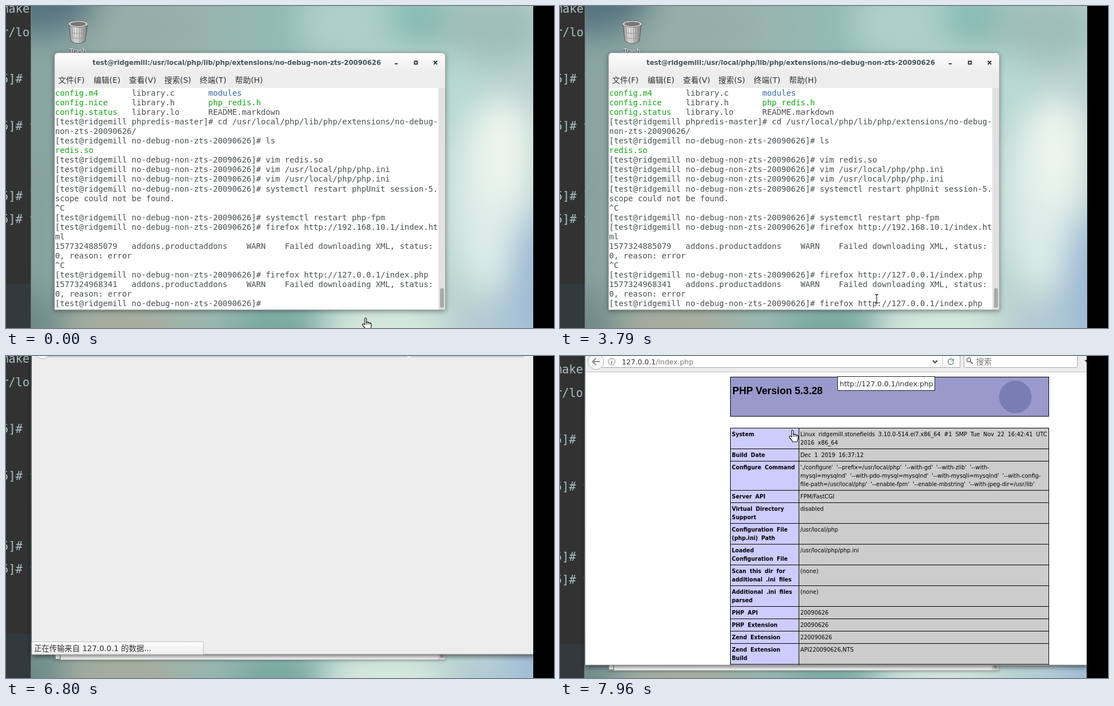
An HTML page for the animation above (8000 ms loop, 976x574 px).

```html
<!DOCTYPE html>
<html lang="zh-CN">
<head>
<meta charset="utf-8">
<title>Terminal and phpinfo</title>
<style>
html, body { margin: 0; width: 100%; height: 100%; overflow: hidden; background: #000 }
svg { display: block; width: 976px; height: 574px }
text { white-space: pre; font-family: "DejaVu Sans", "Noto Sans CJK SC", sans-serif }
.mono { font-family: "DejaVu Sans Mono", monospace }
.term { font-size: 14.16px }
.info { font-size: 9.9px; word-spacing: 2.8px }
.key { font-size: 9.6px; font-weight: bold }
.ui { font-size: 12.7px; fill: #333 }
</style>
</head>
<body>
<svg id="stage" viewBox="0 0 976 574"></svg>
<script>
const LOOP = 8000, CELL = 8.525, ROW = 17.05;
const text = (x, y, s, cls = '', more = '') =>
  `<text x="${x}" y="${y}" class="${cls}" ${more}>${s}</text>`;
const rect = (x, y, w, h, fill, more = '') =>
  `<rect x="${x}" y="${y}" width="${w}" height="${h}" fill="${fill}" ${more}/>`;
const path = (d, stroke, w = 1, fill = 'none', more = '') =>
  `<path d="${d}" stroke="${stroke}" stroke-width="${w}" fill="${fill}" ${more}/>`;
const fade = (id, dir, ...stops) => `<linearGradient id="${id}" ${dir}>` + stops.map((c, i) =>
  `<stop offset="${i / (stops.length - 1)}" stop-color="${c}"/>`).join('') + '</linearGradient>';
const DOWN = 'x2="0" y2="1"';

// Editor strip at the far left
const editor = () => rect(-5, -30, 55, 640, '#323232') + rect(-5, 495, 55, 120, '#333a3e') +
  [[0, 'make'], [1, 'r/lo'], [3, '5]# l'], [5, '5]# v'], [8, '5]# l'], [9, '5]# v']].map(([i, s]) =>
    text(-8, 12 + i * 41.7, s, 'mono', 'font-size="20.8" fill="#a9bfc2"')).join('');

// Soft blurred wallpaper: centre, radii, colour
const wallpaper = () => rect(45, -30, 900, 640, 'url(#sky)') +
  '<g clip-path="url(#desk)"><g filter="url(#soft)">' + [
    [50, 130, 60, 160, '#8aa5a2'], [50, -10, 110, 60, '#55737e'],
    [200, 600, 110, 70, '#a8ac9d'], [40, 580, 60, 70, '#6d8987'],
    [250, 40, 110, 50, '#96aea8'], [480, 590, 80, 60, '#78a8a0'], [600, 30, 80, 60, '#aed0ca'],
    [740, 20, 60, 60, '#86bab4'], [670, 580, 110, 50, '#d9e9df'], [860, 340, 70, 170, '#dcece8'],
    [890, 260, 50, 100, '#edf5ee'], [860, 40, 100, 60, '#9dbdb6'], [800, 140, 40, 60, '#b7d9d2'],
    [880, 590, 70, 60, '#b0c8d6'], [950, 490, 50, 120, '#9db8d4']
  ].map(([x, y, a, b, c]) => `<ellipse cx="${x}" cy="${y}" rx="${a}" ry="${b}" fill="${c}"/>`).join('') +
  '</g></g>' + rect(44, -30, 1, 640, '#777d7c');

const trash = () =>
  path('M112 33L116 63Q128 70 141 63L145 33Z', '#555', 1, 'url(#metal)') +
  [118, 122, 126, 131, 135, 139].map(x => path(`M${x} 39L${128 + (x - 128) * .8} 64`, '#8d8d8d')).join('') +
  path('M114 46Q128 52 143 46M115 55Q128 61 142 55', '#999') +
  '<ellipse cx="128.500" cy="32" rx="17.500" ry="6" fill="#ddd" stroke="#666"/>' +
  '<ellipse cx="128.500" cy="32" rx="14" ry="4" fill="#777"/>' +
  text(113, 85, 'Trash', '', 'font-size="11.5" fill="#fff" style="text-shadow:0 1px 2px #000"');

const DIR = 'no-debug-non-zts-20090626', EXT = '/usr/local/php/lib/php/extensions/';
const ask = (cmd, dir = DIR) => `[test@ridgemill ${dir}]# ${cmd}`;
const warn = id => id + '   addons.productaddons    WARN    Failed downloading XML, status:';
const URL_PATH = '127.0.0.1/index.php', OPEN = 'firefox http://' + URL_PATH;
const LINES = [
  ask('cd ' + EXT + 'no-debug-', 'phpredis-master'), 'non-zts-20090626/', ask('ls'), 'redis.so',
  ask('vim redis.so'), ask('vim /usr/local/php/php.ini'), ask('vim /usr/local/php/php.ini'),
  ask('systemctl restart phpUnit session-5.'), 'scope could not be found.', '^C',
  ask('systemctl restart php-fpm'), ask('firefox http://192.168.10.1/index.ht'), 'ml',
  warn('1577324885079'), '0, reason: error', '^C', ask(OPEN), warn('1577324968341'),
  '0, reason: error', ask('')
];
const GREEN = '#14a614', BLUE = '#3465a4', INK = '#4a5052';
const FILES = [
  ['config.m4', GREEN, 'library.c', INK, 'modules', BLUE],
  ['config.nice', GREEN, 'library.h', INK, 'php_redis.h', GREEN],
  ['config.status', GREEN, 'library.lo', INK, 'README.markdown', INK]
];
const put = (col, row, s, fill = INK) =>
  text(87.5 + col * CELL, 160 + row * ROW, s, 'mono term', `fill="${fill}"`);

const terminal = () =>
  path('M86.500 541.500V90Q86.500 83.500 93 83.500H776Q782.500 83.500 782.500 90V541.500Z',
    '#a9adab', 1, '#ededed', 'id="window"') +
  rect(87, 84, 695, 34, 'url(#bar)', 'rx="6"') +
  '<g id="title">' + text(411, 105, 'test@ridgemill:' + EXT + DIR, '',
    'text-anchor="middle" font-size="11.85" font-weight="bold" fill="#45535a"') +
  path('M692.500 103H697.500M727.500 98.500h5v5h-5zM762 98l6 6M768 98l-6 6', '#2e3436', 2) + '</g>' +
  ['文件(F)', '编辑(E)', '查看(V)', '搜索(S)', '终端(T)', '帮助(H)'].map((s, i) =>
    text(93 + i * 63, 137, s, '', 'font-size="14" fill="#333"')).join('') +
  rect(87, 146, 684, 395, '#fff') + rect(770, 146, 12, 395, '#e2e2e2') +
  rect(773, 503, 7, 35, '#a9abaa', 'rx="3"') +
  '<g clip-path="url(#screen)"><g id="lines">' +
  FILES.map((f, r) => [0, 2, 4].map(i => put(i * 8, r, f[i], f[i + 1])).join('')).join('') +
  LINES.map((s, i) => put(0, i + 3, s, s == 'redis.so' ? GREEN : INK)).join('') +
  `<g id="cmd">${put(44, 22, OPEN)}</g></g>` +
  rect(0, 523, 9, 17, '#1f2628', 'id="block"') + '</g>' +
  '<g id="hollow">' + rect(87.5, 523.5, 9, 17, '#fff', 'stroke="#48624d"') + '</g>';

const FACTS = [
  ['System', 'Linux ridgemill.stonefields 3.10.0-514.el7.x86_64 #1 SMP Tue Nov 22 16:42:41 UTC|2016 x86_64'],
  ['Build Date', 'Dec 1 2019 16:37:12'],
  ['Configure Command', "'./configure' '--prefix=/usr/local/php' '--with-gd' '--with-zlib' '--with-|" +
    "mysql=mysqlnd' '--with-pdo-mysql=mysqlnd' '--with-mysqli=mysqlnd' '--with-config-|" +
    "file-path=/usr/local/php' '--enable-fpm' '--enable-mbstring' '--with-jpeg-dir=/usr/lib'"],
  ['Server API', 'FPM/FastCGI'], ['Virtual Directory|Support', 'disabled'],
  ['Configuration File|(php.ini) Path', '/usr/local/php'],
  ['Loaded|Configuration File', '/usr/local/php/php.ini'],
  ['Scan this dir for|additional .ini files', '(none)'], ['Additional .ini files|parsed', '(none)'],
  ['PHP API', '20090626'], ['PHP Extension', '20090626'], ['Zend Extension', '220090626'],
  ['Zend Extension|Build', 'API220090626,NTS'], ['', '']
];
const lines = (x, y, s, cls) => s.split('|').map((l, i) => text(x, y + 14 + i * 15, l, cls)).join('');
const table = () => {
  let y = 110, out = '';
  for (const [k, v] of FACTS) {
    const h = 7 + 15 * Math.max(k.split('|').length, v.split('|').length);
    out += rect(304.5, y - .5, 122, h, '#ccf', 'stroke="#000"') + rect(426.5, y - .5, 445, h, '#ccc', 'stroke="#000"') +
      lines(307, y, k, 'info key') + lines(429, y, v, 'info');
    y += h;
  }
  return out;
};

const browser = () =>
  rect(46, -40, 895, 572, '#ededed', 'style="filter:drop-shadow(0 3px 5px #0009)"') +
  rect(46, 531.5, 895, 1, '#777') +
  rect(70, -30, 643.5, 31.5, '#fff', 'stroke="#a5a5a5"') + rect(720.5, -30, 202, 31.5, '#fff', 'stroke="#a5a5a5" rx="2"') +
  '<circle cx="65" cy="-9" r="14" fill="#f8f8f8" stroke="#b5b5b5"/>' +
  path('M72 -9H59M65 -15L59 -9L65 -3', '#8a8a8a', 2) +
  '<circle cx="93" cy="-9" r="6" fill="none" stroke="#777"/>' + path('M93 -10V-5M93 -13v1.500', '#777', 1.5) +
  text(111, -4, '127.0.0.1<tspan fill="#777">/index.php</tspan>', 'ui') +
  path('M665 -11l4 4l4 -4', '#444', 2) + path('M682.500 -18V0', '#ccc') +
  path('M701 -12A5 5 0 1 0 702 -8M702 -14v4h-4', '#7d9689', 1.6) +
  '<circle cx="729" cy="-12" r="3.500" fill="none" stroke="#666" stroke-width="1.500"/>' + path('M732 -9l4 4', '#666', 2) +
  text(742, -4, '搜索', '', 'font-size="14" fill="#777"') +
  path('M935 -12h8l-4 5z', 'none', 0, '#444') +
  '<g id="page" clip-path="url(#view)">' + rect(46, 10, 895, 521.5, '#fff') + rect(46, 9, 895, 1, '#c4c4c4') +
  rect(304.5, 18.5, 567, 70, '#99c', 'stroke="#000"') +
  text(308, 49, 'PHP Version 5.3.28', '', 'style="font:bold 17.9px \'Liberation Sans\',sans-serif"') +
  '<circle cx="812" cy="54" r="29" fill="#7a7db3"/>' + table() + '</g>' +
  '<g id="status">' + path('M46 509.500H349Q351.500 509.500 351.500 512V532H46Z', '#c2c2c2', 1, 'url(#bar)') +
  text(50, 526, '正在传输来自 127.0.0.1 的数据...', '', 'font-size="13.6" fill="#333"') + '</g>';

const clip = (id, x, y, w, h) => `<clipPath id="${id}">${rect(x, y, w, h, '#000')}</clipPath>`;
stage.innerHTML = '<defs>' +
  fade('sky', '', '#86a19e', '#9db3aa', '#92bab5', '#b9d7cf', '#b9d0d0') +
  fade('bar', DOWN, '#fdfdfd', '#ededed') + fade('metal', '', '#888', '#f2f2f2', '#bbb', '#777') +
  clip('desk', 45, -30, 900, 640) + clip('screen', 87, 147, 683, 394) + clip('view', 46, 9, 895, 522.5) +
  '<filter id="soft" x="-20%" y="-20%" width="140%" height="140%" color-interpolation-filters="sRGB">' +
  '<feGaussianBlur stdDeviation="28"/></filter></defs>' +
  '<g id="world">' + editor() + wallpaper() + trash() + terminal() +
  `<g id="fox">${browser()}</g>` + rect(939, -30, 60, 640, '#000') + '</g>' +
  '<g id="tip">' + rect(494.5, 36.5, 173, 25, '#fff', 'stroke="#222"') +
  text(498, 54, 'http://' + URL_PATH, 'ui') + '</g>' +
  '<g id="hand">' + path('M5 13V3Q5 1 6.500 1T8 3V9Q10 7.500 11 9.500Q13 8 14 10.500Q16 9.500 16.500 12V16Q16 19 14.500 22H7Q5 18 2 15.500Q0 12.500 2 11.500Q3.500 11.500 5 13Z', '#111', 1.2, '#fff') +
  path('M8 9v4M11 10v3M14 11v2', '#111') + '</g>' +
  '<g id="beam">' + path('M-3 -7.500H-1L0 -6.500L1 -7.500H3M0 -6.500V6.500M-3 7.500H-1L0 6.500L1 7.500H3', '#333', 1.3) + '</g>' +
  '<g id="arrow">' + path('M.500 .500V15L4 11.500L6.500 17L9 16L6.500 10.500H11Z', '#fff', 1, '#111') + '</g>';

// Timelines: each entry holds until the next one
const POINTER = [
  [0, 'hand', 634, 555], [70, 'hand', 634, 562], [150, 'hand', 634, 569], [220],
  [380, 'beam', 567, 564], [450, 'beam', 566, 541], [530], [910, 'beam', 564, 522],
  [4950, 'beam', 620, 470], [5030, 'beam', 747, 330], [5120, 'beam', 536, 203],
  [5350, 'beam', 560, 180], [5430, 'beam', 590, 158], [5500, 'arrow', 588, 120],
  [5580, 'arrow', 570, 90], [5650, 'arrow', 545, 60], [5730, 'arrow', 520, 40],
  [5800, 'arrow', 500, 25], [5880], [6650, 'arrow', 494, 9], [6800],
  [7720, 'hand', 462, 66], [7880, 'hand', 436, 104], [7960, 'hand', 407.5, 131]
];
const BLOCK = [[0, -1], [150, 44], [2000, 78], [2630, -1], [3240, 78], [3790, -1],
  [4170, 0], [4720, -1], [5350, 0], [5880, -1]];
const FADE = [[0, 0], [6260, .04], [6340, .4], [6410, .8], [6490, 1]];
const PAN = [[0, 0], [7430, .3], [7520, .65], [7600, .9], [7720, 1]];
const at = (keys, t) => keys.findLast(k => k[0] <= t);
const $ = id => document.getElementById(id);
const show = (id, on) => $(id).style.display = on ? '' : 'none';

function draw(now) {
  const t = now % LOOP, [, kind, x, y] = at(POINTER, t);
  for (const id of ['hand', 'beam', 'arrow']) show(id, id == kind);
  if (kind) $(kind).setAttribute('transform', `translate(${x} ${y})`);
  const col = at(BLOCK, t)[1];
  show('block', col >= 0);
  $('block').setAttribute('x', 87 + col * CELL);
  show('cmd', t >= 2000);
  $('lines').setAttribute('transform', `translate(0 ${t < 4100 ? 0 : -ROW})`);
  const focused = t < 6260;
  $('window').style.filter = `drop-shadow(0 2px ${focused ? '4px #0006' : '2px #0003'})`;
  $('title').style.opacity = focused ? 1 : .85;
  const alpha = at(FADE, t)[1], pan = at(PAN, t)[1];
  show('fox', alpha > 0);
  $('fox').style.opacity = alpha;
  show('hollow', t >= 6490);
  show('status', t >= 6800 && t < 6880);
  show('page', t >= 6880);
  $('world').setAttribute('transform', `translate(${-Math.round(pan)} ${Math.round(19 * pan)})`);
  show('tip', t >= 7720);
  requestAnimationFrame(draw);
}
requestAnimationFrame(draw);
</script>
</body>
</html>
```
